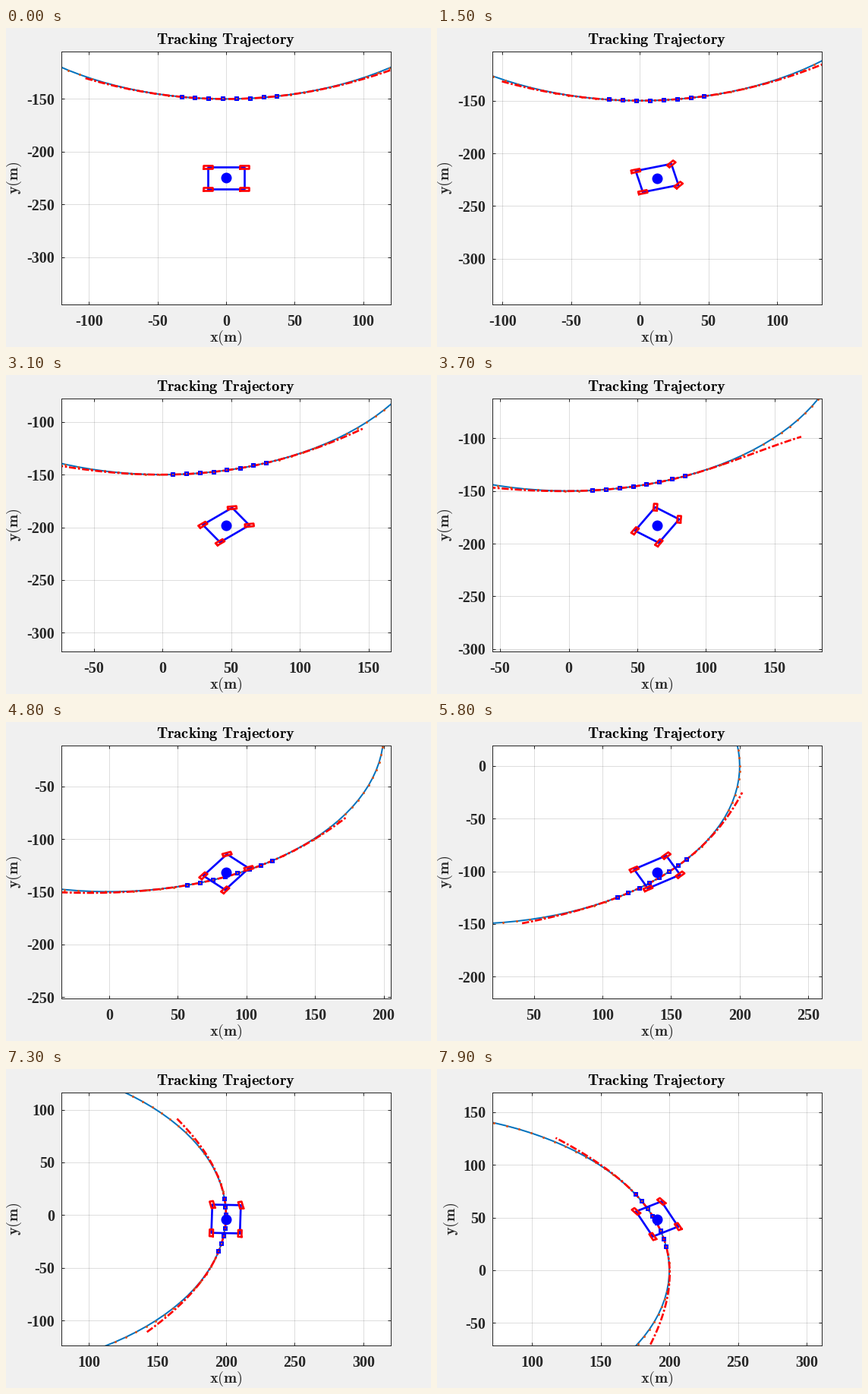
Animation, 560 px wide and 420 px high, one loop 8000 ms. Source, as a matplotlib script:

```python
import numpy as np
import matplotlib.pyplot as plt
from matplotlib.animation import FuncAnimation
from matplotlib.ticker import FuncFormatter, MultipleLocator

W, H, DPI = 560, 420, 100
PX = 72 / DPI                     # one pixel in points
FRAMES, STEP = 80, 100
VIEW = 120                        # half the visible range, metres
HALF_L, HALF_W = 13.4, 10.4       # vehicle half length and width
WHEEL_L, WHEEL_W = 3.2, 1.25
INK = "#262626"

plt.rcParams["mathtext.fontset"] = "cm"
plt.rcParams["font.family"] = "Liberation Serif"

# Reference path
theta = np.arange(0, 2 * np.pi, 0.05)
path = np.column_stack((200 * np.cos(theta), 150 * np.sin(theta)))

# Heading (degrees) against distance driven, at constant acceleration
ACCEL = 0.0582
TURN_S = np.array([0, 1, 13.1, 33.5, 43.5, 61.5, 79.7, 103, 134,
                   159, 184, 213, 237, 261, 363, 380])
TURN_H = np.radians([0, 0, 14.5, 41.5, 53, 30, 56.5, 84, 50,
                     18, 23, 38, 50, 62, 117, 126])

# Waypoints: step, x, y
WAY = np.array([(0, 0, -225), (15, 12.6, -223.4), (24, 30.4, -214),
                (37, 64.4, -182.3), (48, 85.2, -131.3),
                (67, 185.1, -51.8), (79, 191.1, 48.6)])
AHEAD = [130, 130, 118, 107, 100, 101, 106]


def drive():
    """Integrate the heading, then pull the track onto the waypoints."""
    sub = 20
    t = np.arange((FRAMES - 1) * sub + 1) / sub
    s = ACCEL * t ** 2
    h = np.interp(s, TURN_S, TURN_H)
    mid = (h[1:] + h[:-1]) / 2
    ds = np.diff(s)
    track = []
    for start, part, goal in ((0, np.cos(mid), WAY[:, 1]),
                              (-225, np.sin(mid), WAY[:, 2])):
        raw = start + np.concatenate(([0], np.cumsum(ds * part)))
        error = goal - np.interp(WAY[:, 0], t, raw)
        track.append((raw + np.interp(t, WAY[:, 0], error))[::sub])
    return np.column_stack(track), h[::sub]


track, heading = drive()


def steering(n):
    s = ACCEL * n ** 2
    i = min(np.searchsorted(TURN_S, s + 0.4, side="right") - 1, len(TURN_S) - 2)
    rate = (TURN_H[i + 1] - TURN_H[i]) / (TURN_S[i + 1] - TURN_S[i])
    return np.arctan(2 * HALF_L * rate)


def rot(a):
    return np.array([[np.cos(a), -np.sin(a)], [np.sin(a), np.cos(a)]])


def box(length, width):
    return np.array([(-1, -1), (1, -1), (1, 1), (-1, 1), (-1, -1)]) * (length, width)


fig = plt.figure(figsize=(W / DPI, H / DPI), dpi=DPI, facecolor="#f0f0f0")
ax = fig.add_axes([73 / W, 56 / H, 434 / W, 333 / H], facecolor="white")
ax.set_axisbelow(True)
ax.grid(True, color=INK, alpha=0.15, linewidth=PX)
for spine in ax.spines.values():
    spine.set(color=INK, linewidth=PX)
for axis, pad in ((ax.xaxis, 13), (ax.yaxis, 9)):
    axis.set_major_locator(MultipleLocator(50))
    axis.set_major_formatter(FuncFormatter(lambda v, _: str(int(round(v)))))
    axis.set_tick_params(direction="in", length=4.3 * PX, width=PX, pad=pad * PX,
                         color=INK, labelcolor=INK, labelsize=20 * PX)
ax.tick_params(top=True, right=True)
for label in ax.get_xticklabels() + ax.get_yticklabels():
    label.set_fontweight("bold")


def caption(x, y, text, **kw):
    return fig.text(x / W, 1 - y / H, r"$\mathbf{%s}$" % text, ha="center",
                    va="baseline", fontsize=20.5 * PX, **kw)


caption(290, 21, r"Tracking\ Trajectory", color="black")
caption(290, 413, "x(m)", color=INK)
y_label = caption(16, 197.5, "y(m)", color=INK, rotation=90, rotation_mode="anchor")


def line(color, width, **kw):
    return ax.plot([], [], color=color, linewidth=width * PX, **kw)[0]


loop = np.vstack((path, path[:1]))
line("#0072bd", 2).set_data(*loop.T)
line("#d95319", 0, marker="o", markersize=3 * PX, markeredgewidth=0).set_data(*path.T)
fit = line("red", 2.67, linestyle=(0, (3.5, 1, 1, 1)), dash_capstyle="butt")
near = line("blue", 0, marker="s", markersize=4 * PX, markerfacecolor="none",
            markeredgewidth=2 * PX)
body = line("blue", 2.67)
wheels = [line("red", 2.67) for _ in range(4)]
dot = line("blue", 0, marker="o", markersize=14 * PX, markeredgewidth=0)


def draw(n):
    pos, h = track[n], heading[n]
    turn = rot(h)
    ax.set_xlim(pos[0] - VIEW, pos[0] + VIEW)
    ax.set_ylim(pos[1] - VIEW, pos[1] + VIEW)
    for label in ax.get_xticklabels() + ax.get_yticklabels():
        label.set_fontweight("bold")
    y_label.set_x((24 if pos[1] - VIEW > -100 else 16) / W)

    # Path points around the one nearest to the rear of the vehicle
    rear = pos - 7 * turn[:, 0]
    k = np.argmin(np.sum((path - rear) ** 2, axis=1))
    pts = path[np.arange(k - 3, k + 5) % len(path)]
    near.set_data(*pts.T)

    # Cubic fit in the vehicle's frame
    local = (pts - pos) @ turn
    cubic = np.polyfit(local[:, 0], local[:, 1], 3)
    u = np.linspace(local[3, 0] - 100,
                    local[3, 0] + np.interp(n, WAY[:, 0], AHEAD), 120)
    curve = np.column_stack((u, np.polyval(cubic, u))) @ turn.T + pos
    fit.set_data(*curve.T)

    corners = box(HALF_L, HALF_W)
    body.set_data(*(corners @ turn.T + pos).T)
    steer = steering(n)
    for wheel, corner in zip(wheels, corners):
        angle = h + (steer if corner[0] > 0 else 0)
        shape = box(WHEEL_L, WHEEL_W) @ rot(angle).T
        wheel.set_data(*(shape + corner @ turn.T + pos).T)
    dot.set_data([pos[0]], [pos[1]])
    return []


anim = FuncAnimation(fig, draw, frames=FRAMES, init_func=lambda: draw(0),
                     interval=STEP, repeat=True, repeat_delay=0, blit=False)
plt.show()
```
